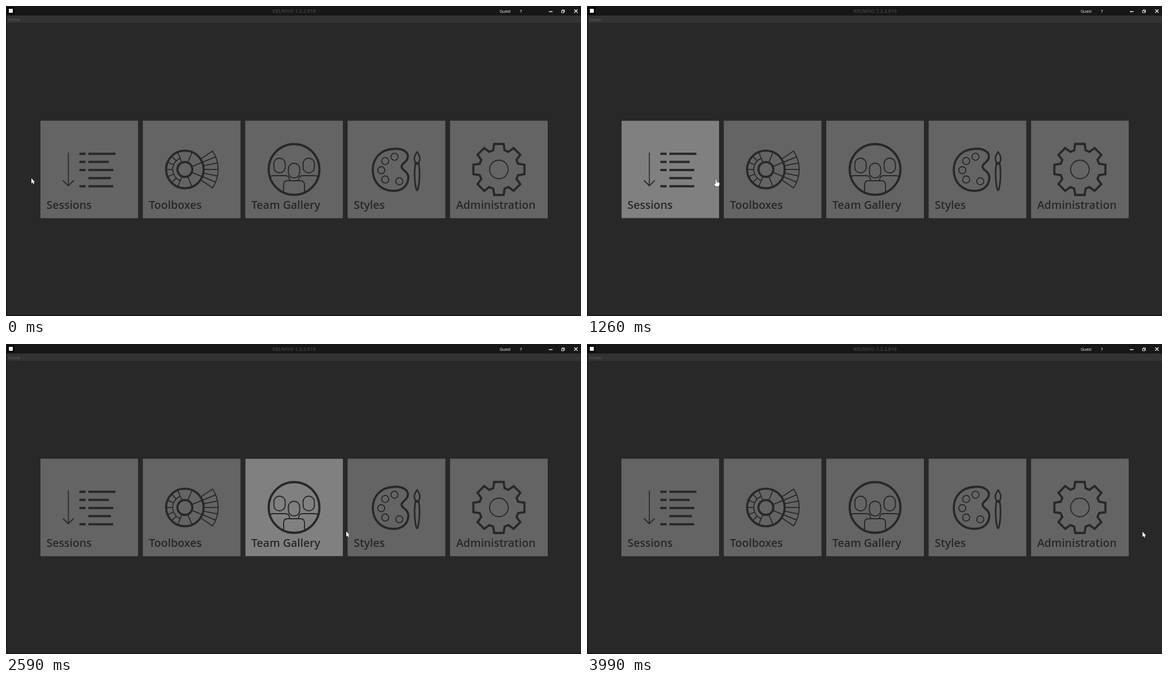
These frames come from a looping animation (1019 by 550 pixels, 4.06 s). An HTML page with a canvas:

```html
<!DOCTYPE html>
<html lang="en">
<head>
<meta charset="utf-8">
<title>Home</title>
<style>
  html, body { margin: 0; width: 100%; height: 100%; overflow: hidden; background: #282828; }
  canvas { display: block; }
</style>
</head>
<body>
<canvas id="stage" width="1019" height="550"></canvas>
<script>
const ctx = document.getElementById('stage').getContext('2d');
const FONT = '"Open Sans", "Noto Sans", sans-serif';
const INK = '#282828';
const LOOP = 4060, STEP = 70;
const TILE = { x: 61, y: 203.5, size: 173, pitch: 181.5 };
const LABELS = ['Sessions', 'Toolboxes', 'Team Gallery', 'Styles', 'Administration'];

// Pointer stops: time in ms, x, y
const STOPS = [
  [70, 45, 305.5], [350, 60, 305], [630, 83, 304.5], [770, 102.5, 304], [1190, 211, 304],
  [1400, 264, 314.5], [2030, 424, 332], [2590, 603, 332.5], [3360, 802.5, 333], [3990, 984.5, 333]
];

function rect(x, y, w, h, color) {
  ctx.fillStyle = color;
  ctx.fillRect(x, y, w, h);
}

function text(str, x, y, size, weight, color, align = 'left') {
  ctx.font = `${weight} ${size}px ${FONT}`;
  ctx.textAlign = align;
  ctx.fillStyle = color;
  ctx.fillText(str, x, y);
}

function stroke(d, width, color = INK) {
  ctx.lineWidth = width;
  ctx.strokeStyle = color;
  ctx.stroke(new Path2D(d));
}

function ring(x, y, r, width, from = 0, to = 360) {
  ctx.lineWidth = width;
  ctx.strokeStyle = INK;
  ctx.beginPath();
  ctx.arc(x, y, r, from * Math.PI / 180, to * Math.PI / 180);
  ctx.stroke();
}

function polar(cx, cy, r, deg) {
  const a = deg * Math.PI / 180;
  return `${cx + r * Math.cos(a)} ${cy + r * Math.sin(a)}`;
}

function drawSessions() {
  stroke('M110.5 260V319', 1.7);
  stroke('M101 309.5L110.5 319L120 309.5', 1.9);
  [194, 182, 190, 186, 190].forEach((end, i) => {
    const y = 260.2 + i * 14.4;
    if (i !== 3) rect(130, y, 11, 4, INK);
    rect(146, y, end - 146, 4, INK);
  });
}

function drawToolboxes() {
  const cx = 317, cy = 290;
  const spoke = (deg, r1, r2) =>
    stroke(`M${polar(cx, cy, r1, deg)}L${polar(cx, cy, r2, deg)}`, 1.8);
  ring(cx, cy, 33.3, 3.8);
  ring(cx, cy, 13.2, 3.8);
  ring(cx, cy, 21.5, 1.8, 112.5, 247.5);
  for (const deg of [22.5, 67.5, 112.5, 247.5, 292.5, 337.5]) spoke(deg, 14, 33);
  for (let deg = 135; deg < 240; deg += 22.5) spoke(deg, 21.5, 33);
  for (let i = -3; i <= 3; i++) spoke(i * 11.2, 34, 59.5);
  ring(cx, cy, 59, 1.8, -33.6, 33.6);
}

function drawTeam() {
  ring(510.5, 290, 45, 3.8);
  ctx.lineWidth = 1.9;
  for (const [x, y] of [[484.7, 283], [536.5, 283], [510.5, 292]]) {
    ctx.beginPath();
    ctx.roundRect(x - 10, y - 13, 20, 26, 9.6);
    ctx.stroke();
  }
  stroke('M468 303Q470 301 474 301H495Q502 301 502.500 308V310', 1.9);
  stroke('M553 303Q551 301 547 301H526Q519 301 518.500 308V310', 1.9);
  stroke('M492 332V317Q492 310 499 310H522Q529 310 529 317V332', 1.9);
}

function drawStyles() {
  stroke('M687 253.500C701 252 714 258 712 269C710 278 701 279 701 285' +
    'C701 292 714 293 713 306C712 320 701 328 687 328' +
    'C664 328 650 312 650 291C650 270 664 254.500 687 253.500Z', 3.8);
  for (const [x, y] of [[688.5, 267.5], [672, 275], [665, 291.3], [672, 307.8], [697, 311]])
    ring(x, y, 6.3, 1.8);
  stroke('M728.500 259C722 268 723 273 725.500 278H731.500C734 273 735 268 728.500 259Z', 2.6);
  stroke('M725.500 280C722 300 726 327 728.500 327C731 327 735 300 731.500 280Z', 2.8);
}

function drawGear() {
  const cx = 873.5, cy = 290, pts = [];
  for (let a = 0; a < 360; a += 45)
    for (const [r, off] of [[35.5, -16.5], [46, -10.5], [46, 10.5], [35.5, 16.5]])
      pts.push(polar(cx, cy, r, a + off));
  stroke(`M${pts.join('L')}Z`, 3.8);
  ring(cx, cy, 16.5, 1.8);
}

function drawWindow() {
  rect(0, 0, 1019, 550, INK);
  rect(0, 0, 1019, 17, '#171717');
  rect(0, 17, 1019, 13, '#333333');
  rect(0, 17, 2, 533, '#1a1a1a');
  rect(0, 548, 1019, 2, '#1d171a');
  rect(2, 2, 13, 13, '#000');
  rect(5, 5, 7, 7, '#fff');
  text('KELNIVO 1.2.2.819', 510.5, 12, 8.6, 700, '#3d3d3d', 'center');
  text('Home', 4.5, 26.6, 7.2, 400, '#626262');
  text('Guest', 875, 11.6, 7, 400, '#fff');
  text('?', 911, 11.6, 7, 600, '#fff');
  stroke('M962 10H968.500', 1.4, '#fff');
  stroke('M984.500 8.500H988.500V12H984.500ZM985.500 8V6.800H989.700V11H989', 0.9, '#fff');
  stroke('M1007 6L1013 12M1013 6L1007 12', 1.1, '#fff');
}

function drawTiles(lit) {
  LABELS.forEach((label, i) => {
    const x = TILE.x + i * TILE.pitch;
    rect(x, TILE.y, TILE.size, TILE.size, '#646464');
    if (i === lit) rect(Math.round(x + 0.6), 204, 172, 172, '#808080');
    text(label, x + 10.7, 359.8, 19.5, 600, INK);
  });
  drawSessions();
  drawToolboxes();
  drawTeam();
  drawStyles();
  drawGear();
}

function drawPointer(x, y, isHand) {
  const arrow = 'M0 0V9.300L2.100 7.400L3.600 10.600L5 10L3.600 6.900H6.300Z';
  const hand = 'M-1 1Q0 -.5 1 1V4.500L5 5.300Q6 5.600 6 7V9.500L4.800 12.800H-.8' +
    'L-3.300 8.500Q-3.600 7 -2.300 7.200L-1 8.400Z';
  const path = new Path2D(isHand ? hand : arrow);
  ctx.save();
  ctx.translate(x, y);
  ctx.strokeStyle = '#111';
  ctx.lineWidth = 1;
  ctx.stroke(path);
  ctx.fillStyle = '#fff';
  ctx.fill(path);
  if (isHand) stroke('M2.300 5V7.500M4.100 5.500V7.500', 0.4, '#555');
  ctx.restore();
}

function pointerAt(t) {
  const next = STOPS.findIndex(s => s[0] >= t);
  if (next <= 0) return STOPS[0].slice(1);
  const [t0, x0, y0] = STOPS[next - 1], [t1, x1, y1] = STOPS[next];
  const k = (t - t0) / (t1 - t0);
  return [x0 + (x1 - x0) * k, y0 + (y1 - y0) * k];
}

function frame(now) {
  const t = Math.floor((now % LOOP) / STEP) * STEP;
  const [x, y] = pointerAt(t);
  const offset = x - TILE.x - 1;
  // A tile stays lit while the pointer crosses the gap after it
  const lit = Math.floor(offset / TILE.pitch);
  const isHand = lit >= 0 && lit < LABELS.length && offset - lit * TILE.pitch < TILE.size;
  drawWindow();
  drawTiles(lit);
  drawPointer(x, y, isHand);
}

let start;
function tick(now) {
  start ??= now;
  frame(now - start);
  requestAnimationFrame(tick);
}
requestAnimationFrame(tick);
</script>
</body>
</html>
```
